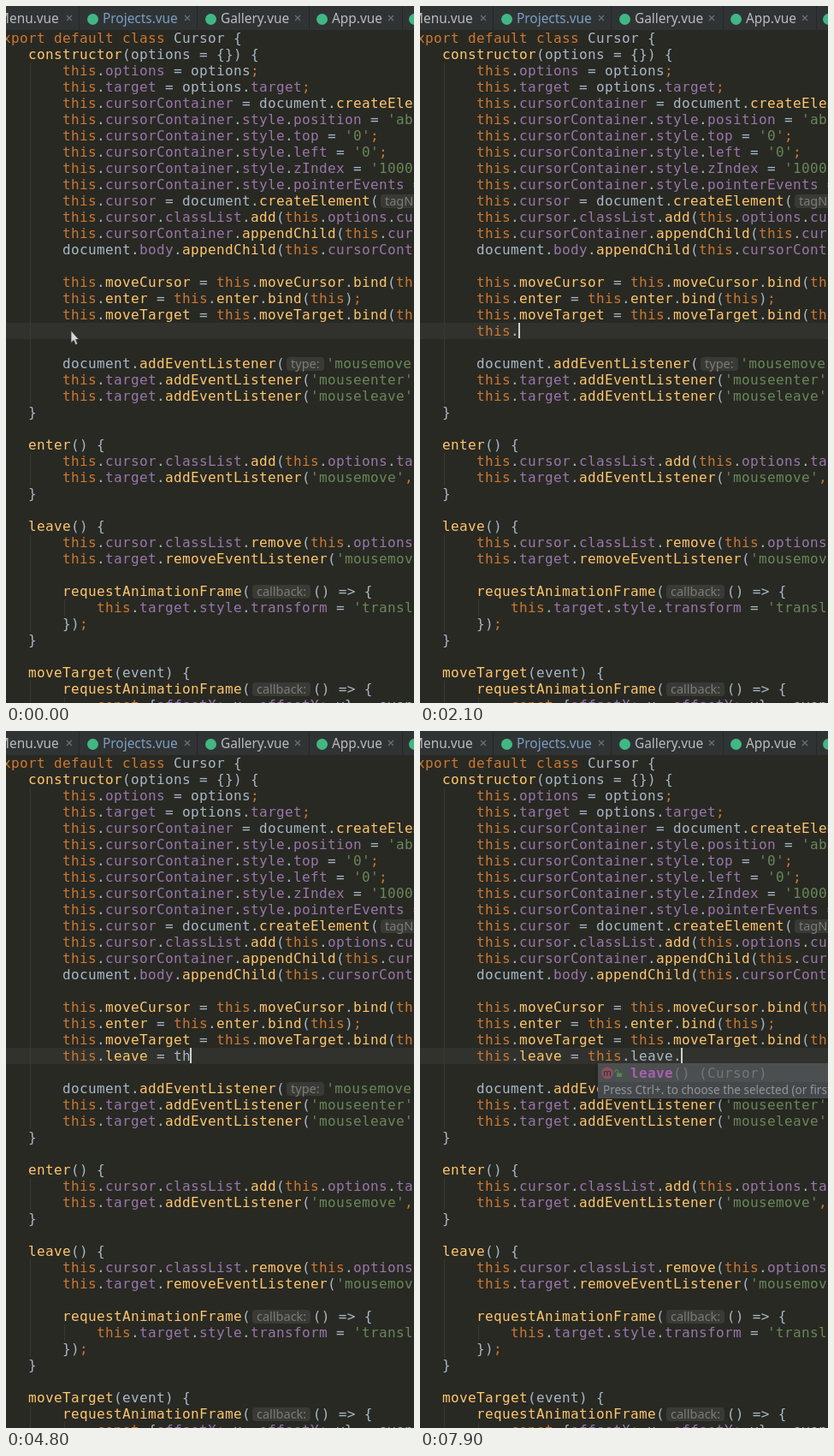
Animation, 477 px wide and 814 px high, one loop 8000 ms. Source, as an HTML page:

```html
<!DOCTYPE html>
<html lang="en">
<head>
<meta charset="utf-8">
<title>Editor completion</title>
<style>
html, body { margin: 0; width: 100%; height: 100%; overflow: hidden; background: #282923; }
#stage { position: relative; width: 477px; height: 814px; overflow: hidden; background: #282923; }
#stage div, #stage svg { position: absolute; }
.mono {
  font: 16px/19px "DejaVu Sans Mono", monospace;
  letter-spacing: calc(10px - 1ch);
  white-space: pre;
  color: #a9b7c6;
}
.ui { font-family: "Noto Sans", sans-serif; letter-spacing: 0; white-space: pre; }
.kw { color: #cc7832; }
.fn { color: #ffc66d; }
.field { color: #9876aa; }
.str { color: #6a8759; }
.inlay {
  display: inline-block; height: 16px; margin: 2px 2.5px 0 2px; padding: 0 5px;
  border-radius: 4px; vertical-align: top;
  font-size: 14.5px; line-height: 15px; color: #7b7c79; background: #393a36;
}
.guide { width: 1px; background: #373833; }
#tabs { left: 0; top: 0; width: 477px; height: 28px; background: #303334; }
#tabs .name { top: 4px; font-size: 15.4px; line-height: 21px; color: #bbbbbb; }
#tabs .sep { top: 0; width: 1px; height: 28px; background: #25282a; }
#tabs .dot { top: 9px; width: 13px; height: 13px; border-radius: 50%; background: #41b883; }
#current { left: 0; top: 370px; width: 477px; height: 19px; background: #31322d; }
#caret { top: 370px; width: 2px; height: 18px; background: #d0d0d0; }
#popup {
  top: 388px; width: 600px; overflow: hidden; box-sizing: border-box;
  border: 1px solid #4d5052; background: #3b3f40; box-shadow: 0 2px 4px rgba(0, 0, 0, .3);
}
#popup .row { left: 0; width: 600px; height: 21px; line-height: 21px; color: #a3a6a6; }
#popup .on { background: #4b4f50; }
#popup .label { left: 37px; top: 0; }
#popup .tail, #popup .dim { color: #72767a; }
#popup b b { color: #a85fb0; }
#popup i { font-style: normal; color: #a85fb0; }
#popup .hint {
  left: 0; width: 600px; height: 19px; padding-left: 5px;
  font-size: 13.5px; line-height: 18px; color: #92969a; background: #44484a;
}
</style>
</head>
<body>
<div id="stage">
  <div id="tabs"></div>
  <div id="current"></div>
  <div id="code"></div>
  <div id="line" class="mono" style="left:66px;top:370px"></div>
  <div id="caret"></div>
  <div id="popup" class="mono"></div>
  <svg id="pointer" style="left:75px;top:378px" width="12" height="20">
    <path d="M1 1V15.3L4.2 12.4L6.4 17.6L8.7 16.6L6.5 11.5H10.2Z" fill="#d6d6d6" stroke="#3a3a3a" stroke-width=".8"/>
  </svg>
</div>
<script>
const $ = id => document.getElementById(id);
const LEFT = 66, TOP = 28, CELL = 10, LINE = 19, ROW = 21, LOOP = 8000;

const source = `export default class Cursor {
    constructor(options = {}) {
        this.options = options;
        this.target = options.target;
        this.cursorContainer = document.createElement('div');
        this.cursorContainer.style.position = 'absolute';
        this.cursorContainer.style.top = '0';
        this.cursorContainer.style.left = '0';
        this.cursorContainer.style.zIndex = '1000';
        this.cursorContainer.style.pointerEvents = 'none';
        this.cursor = document.createElement(#tagName:#'div');
        this.cursor.classList.add(this.options.cursorClass);
        this.cursorContainer.appendChild(this.cursor);
        document.body.appendChild(this.cursorContainer);

        this.moveCursor = this.moveCursor.bind(this);
        this.enter = this.enter.bind(this);
        this.moveTarget = this.moveTarget.bind(this);


        document.addEventListener(#type:#'mousemove', this.moveCursor);
        this.target.addEventListener('mouseenter', this.enter);
        this.target.addEventListener('mouseleave', this.leave);
    }

    enter() {
        this.cursor.classList.add(this.options.targetClass);
        this.target.addEventListener('mousemove', this.moveTarget);
    }

    leave() {
        this.cursor.classList.remove(this.options.targetClass);
        this.target.removeEventListener('mousemove', this.moveTarget);

        requestAnimationFrame(#callback:#() => {
            this.target.style.transform = 'translate(0, 0)';
        });
    }

    moveTarget(event) {
        requestAnimationFrame(#callback:#() => {
            const {offsetX: x, offsetY: y} = event;`;

const keywords = /^(export|default|class|this|const|[;,])$/;
const methods = /^(moveCursor|moveTarget|enter|leave)$/;
const span = (cls, s) => `<span class="${cls}">${s}</span>`;

// Text after "|" stays uncoloured.
function paint(text) {
  const [live, plain = ''] = text.split('|');
  return live.replace(/#([^#]+)#|'[^']*'|[A-Za-z]\w*|[;,]|[<>&]/g, (s, inlay, at) => {
    if (inlay) return span('inlay ui', inlay);
    if (s === '>') return '&gt;';
    if (s[0] === "'") return span('str', s);
    if (keywords.test(s)) return span('kw', s);
    if (live[at + s.length] === '(' || methods.test(s)) return span('fn', s);
    if (live[at - 1] === '.' || /^offset/.test(s)) return span('field', s);
    return s;
  }) + plain;
}

function guide(x, from, to) {
  return `<div class="guide" style="left:${x}px;top:${TOP + from * LINE}px;height:${(to - from) * LINE}px"></div>`;
}

$('code').innerHTML =
  guide(28, 2, 23) + guide(28, 26, 28) + guide(28, 31, 37) + guide(28, 40, 42) +
  guide(68, 35, 36) + guide(68, 41, 42) +
  source.split('\n').map((s, i) =>
    `<div class="mono" style="left:-14px;top:${TOP + i * LINE}px">${paint(s)}</div>`).join('');

// name, text x, close x, separator x, colour
const tabs = [
  ['Menu.vue', -10, 74, 85, ''],
  ['Projects.vue', 113, 212, 223, '#7a9fc4'],
  ['Gallery.vue', 251, 341, 354, ''],
  ['App.vue', 381, 450, 463, ''],
  ['Home.vue', 489, 560, 570, '']
];
$('tabs').innerHTML = tabs.map(([name, x, close, sep, color]) => `
  <div class="dot" style="left:${x - 18}px"></div>
  <div class="name ui" style="left:${x}px;color:${color}">${name}</div>
  <svg style="left:${close - 4}px;top:10px" width="8" height="8"><path d="M1 1L7 7M7 1L1 7" stroke="#6e7173" stroke-width="1.2"/></svg>
  <div class="sep" style="left:${sep}px"></div>`).join('');

const item = (icon, name, tail = '', bold = true, right = '') => ({ icon, name, tail, bold, right });
const own = (icon, name, args = '') => item(icon, name, args + ' (Cursor)');
const members = [
  own('m', 'leave', '()'), own('f', 'target'), own('f', 'cursorContainer'), own('f', 'cursor'),
  own('m', 'enter', '()'), own('m', 'moveCursor', '(event)'), own('m', 'moveTarget', '(event)'),
  own('f', 'options'), own('f', 'xPos'), own('f', 'yPos')
];
const locale = item('m', 'toLocaleString', '()', false);
const enumerable = item('m', 'propertyIsEnumerable', '(v: PropertyKey)', false);
const valueOf = item('m', 'valueOf', '()', false);
const letItem = item('', 'let', '', false, [381, 'let name']);
const logItem = item('', 'log', '', false, [361, 'console.log']);

const thisList = [item('', 'this'), item('p', 'this', ' (prismjs)'),
  ...members.map(m => ({ ...m, name: 'this.' + m.name }))];

function listFor(prefix) {
  if (prefix[0] === 't') return thisList;
  if (prefix === '') return [...members, locale, valueOf];
  if (prefix === 'l') return [members[0], locale, enumerable, valueOf, letItem, logItem];
  if (prefix === 'le') return [members[0], locale, enumerable, letItem];
  return [members[0]];
}

const iconColor = { m: '#8a4f5e', f: '#97702f', p: '#645f96' };
function drawIcon(kind) {
  if (!kind) return '';
  const lock = kind === 'm'
    ? '<path d="M19 9.5V8.5a1.7 1.7 0 0 1 3.4 0V11" fill="none" stroke="#4f8a4c" stroke-width="1.2"/><path d="M21 10.5h6v4.5h-6z" fill="#4f8a4c"/>'
    : '';
  return `<svg style="left:0;top:0" width="34" height="21"><circle cx="10" cy="10.5" r="7" fill="${iconColor[kind]}"/>
    <text x="10" y="14" text-anchor="middle" font-family="Noto Sans, sans-serif" font-size="10.5" letter-spacing="0" fill="#2c2d2d">${kind}</text>${lock}</svg>`;
}

function drawItem({ icon, name, tail, bold, right }, i, prefix) {
  const at = right ? -1 : name.toLowerCase().indexOf(prefix);
  const tag = bold ? 'b' : 'i';
  const marked = at < 0 || !prefix ? name
    : `${name.slice(0, at)}<${tag}>${name.substr(at, prefix.length)}</${tag}>${name.slice(at + prefix.length)}`;
  const side = right ? `<div class="tail" style="left:${right[0]}px;top:0">${right[1]}</div>` : '';
  return `<div class="row${i ? '' : ' on'}" style="top:${i * ROW}px">${drawIcon(icon)}
    <div class="label">${bold ? `<b>${marked}</b>` : marked}${span('dim', tail)}</div>${side}</div>`;
}

function drawPopup(col, prefix) {
  const list = listFor(prefix);
  const body = Math.min(list.length * ROW, 240);
  const hint = col === 5
    ? 'Ctrl+Down and Ctrl+Up will move caret down and up in the editor'
    : 'Press Ctrl+. to choose the selected (or first) suggestion and insert a dot afterwards';
  const box = $('popup');
  box.style.left = LEFT + col * CELL - 38 + 'px';
  box.style.height = body + 20 + 'px';
  box.innerHTML = list.map((it, i) => drawItem(it, i, prefix)).join('') +
    `<div class="hint ui" style="top:${body}px">${hint}</div>`;
}

// time, typed text, popup [column, prefix], caret, pointer
const a = 'this.|', b = 'this.leave = ', c = b + 'this.|';
const steps = [
  [0, '', null, 0, 1],
  [400, '', null, 1, 1],
  [500, '', null, 1],
  [1100, '', null, 0],
  [1200, 't', null, 1],
  [1400, 't', [0, 't'], 1],
  [1600, 'th', [0, 'th'], 1],
  [1700, 'thi', [0, 'thi'], 1],
  [1800, 'this', [0, 'this'], 1],
  [2100, a, null, 1],
  [2200, a, [5, ''], 1],
  [2500, a + 'l', [5, 'l'], 1],
  [2600, a + 'le', [5, 'le'], 1],
  [2900, a + 'lea', [5, 'lea'], 1],
  [3200, a + 'leav', [5, 'leav'], 1],
  [3300, a + 'leave', [5, 'leav'], 1],
  [3400, a + 'leave', [5, 'leave'], 1],
  [3700, a + 'leave ', null, 1],
  [4000, b, null, 1],
  [4700, b + 't', null, 1],
  [4800, b + 'th', null, 1],
  [4900, b + 'th', [13, 'th'], 1],
  [5100, b + 'thi', [13, 'thi'], 1],
  [5200, b + 'this', [13, 'this'], 1],
  [5500, c, [18, ''], 1],
  [5800, c + 'l', [18, 'l'], 1],
  [6000, c + 'le', [18, 'le'], 1],
  [6200, c + 'lea', [18, 'lea'], 1],
  [6600, c + 'leav', [18, 'leav'], 1],
  [6700, c + 'leave', [18, 'leav'], 1],
  [6800, c + 'leave', [18, 'leave'], 1],
  [7600, c + 'leave', [18, 'leave'], 0],
  [7900, c + 'leave.', [18, 'leave'], 1]
];

const show = (id, on) => { $(id).style.display = on ? 'block' : 'none'; };

function apply([, text, popup, caret, pointer]) {
  $('line').innerHTML = paint(text);
  $('caret').style.left = LEFT - 1 + text.replace('|', '').length * CELL + 'px';
  show('caret', caret);
  show('pointer', pointer);
  show('popup', popup);
  if (popup) drawPopup(...popup);
}

const start = performance.now();
let shown = null;
function tick() {
  const t = (performance.now() - start) % LOOP;
  const step = steps.filter(s => s[0] <= t).pop();
  if (step !== shown) apply(shown = step);
  requestAnimationFrame(tick);
}
tick();
</script>
</body>
</html>
```
